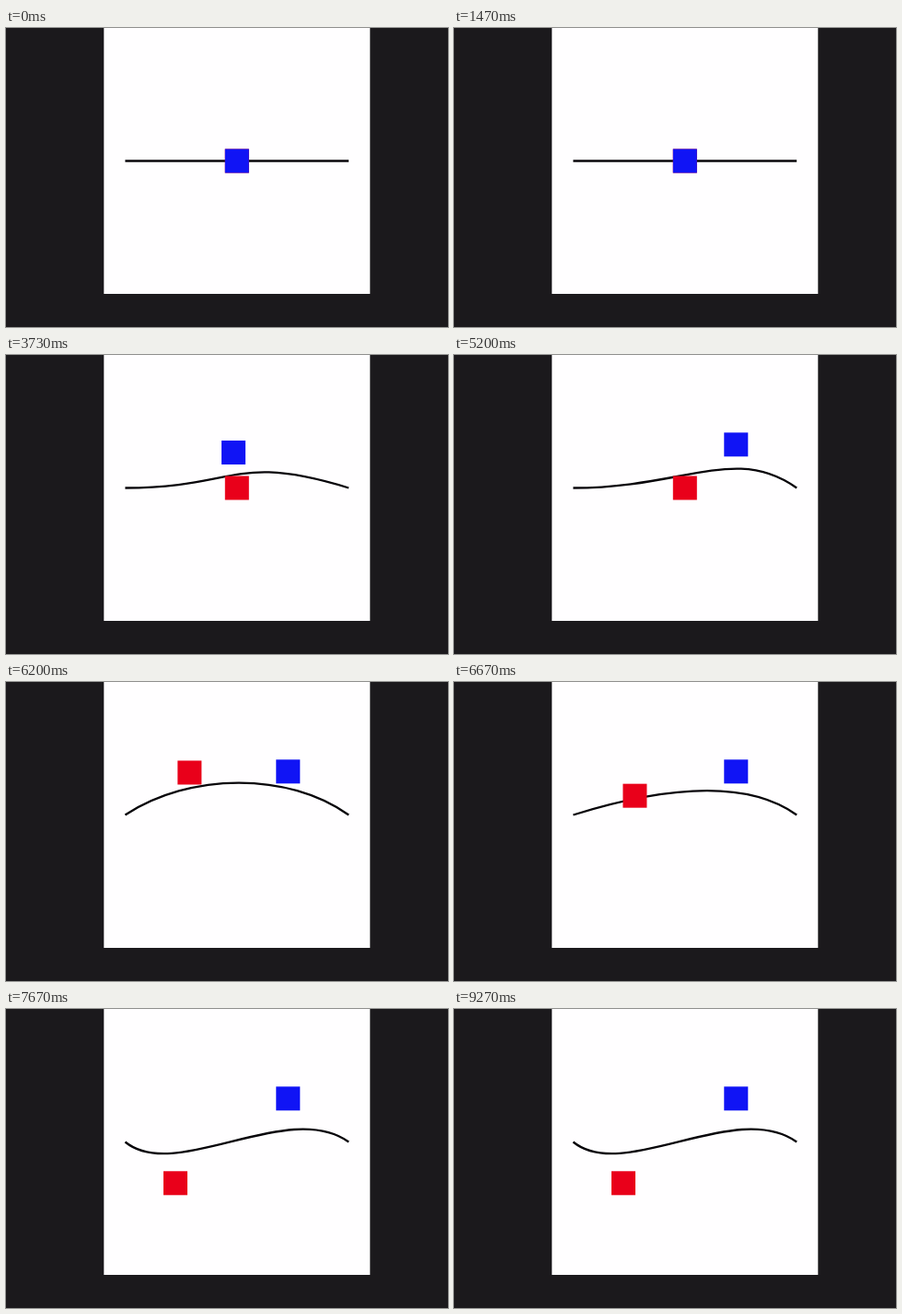
Animation, 480 px wide and 325 px high, one loop 9590 ms. Source, as an HTML page:

```html
<!DOCTYPE html>
<html lang="en">
<head>
<meta charset="utf-8">
<title>Bezier curve handles</title>
<style>
  html, body { margin: 0; width: 100%; height: 100%; overflow: hidden; background: #1b191c; }
  svg { display: block; width: 480px; height: 325px; }
</style>
</head>
<body>
<svg viewBox="0 0 480 325">
  <!-- A 500 unit board, scaled down -->
  <g transform="translate(106.3 0) scale(.578)">
    <rect width="500" height="500" fill="#fffeff"/>
    <path id="curve" fill="none" stroke="#08060a" stroke-width="4"/>
    <rect id="red" x="-22.5" y="-22.5" width="45" height="45" fill="#e9001a"/>
    <rect id="blue" x="-22.5" y="-22.5" width="45" height="45" fill="#1014f5"/>
  </g>
</svg>
<script>
  const LOOP = 9590;
  const STEP = 1000 / 15;
  const CENTER = { x: 250, y: 250 };

  // Each drag eases to a point; bow pushes its path sideways midway
  const blueDrags = [
    { from: 2200, to: 3600, x: 243.5, y: 183.4, bow: 4.5 },
    { from: 3730, to: 4350, x: 346, y: 168.4, bow: 0 }
  ];
  const redDrags = [
    { from: 5400, to: 6200, x: 161, y: 170.4, bow: 0 },
    { from: 6320, to: 7320, x: 134.4, y: 327.5, bow: 2.6 }
  ];

  const clamp = u => Math.min(1, Math.max(0, u));
  const smooth = u => u * u * (3 - 2 * u);

  function handleAt(drags, t) {
    return drags.reduce((p, drag) => {
      const u = clamp((t - drag.from) / (drag.to - drag.from));
      const k = smooth(u);
      return {
        x: p.x + (drag.x - p.x) * k + drag.bow * Math.sin(Math.PI * u),
        y: p.y + (drag.y - p.y) * k
      };
    }, CENTER);
  }

  const curve = document.getElementById('curve');
  const red = document.getElementById('red');
  const blue = document.getElementById('blue');

  const place = (square, p) => square.setAttribute('transform', `translate(${p.x} ${p.y})`);

  function draw(now) {
    const t = Math.floor((now % LOOP + 5) / STEP) * STEP;
    const p1 = handleAt(redDrags, t);
    const p2 = handleAt(blueDrags, t);
    place(red, p1);
    place(blue, p2);
    curve.setAttribute('d', `M40 250C${p1.x} ${p1.y} ${p2.x} ${p2.y} 460 250`);
  }

  const start = performance.now();
  function tick() {
    draw(performance.now() - start);
    requestAnimationFrame(tick);
  }
  tick();
</script>
</body>
</html>
```
